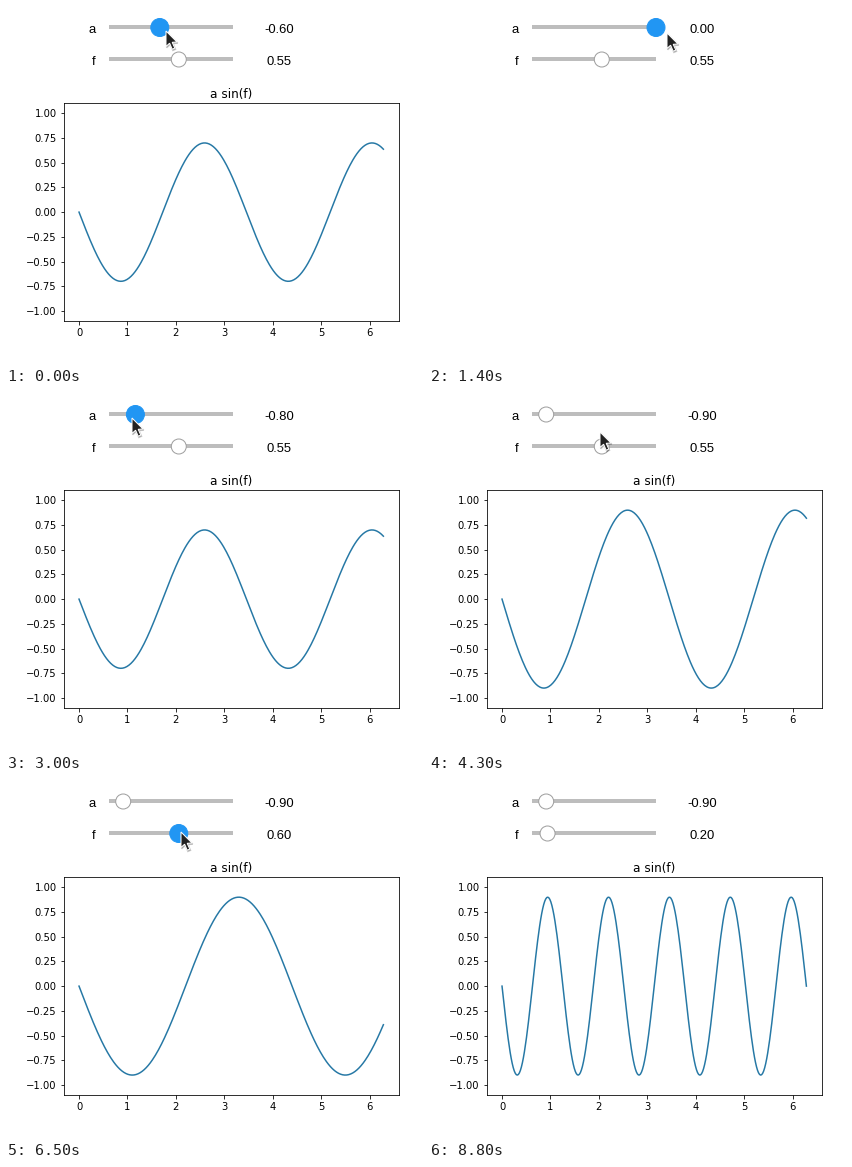
These frames come from a looping animation (417 by 359 pixels, 9100 ms). A matplotlib script:

```python
import numpy as np
import matplotlib.pyplot as plt
from matplotlib.animation import FuncAnimation
from matplotlib.patches import Circle, Polygon, Rectangle

W, H, DPI = 417, 359, 72
STEP, LOOP = 100, 9100
BLUE, GREY, EDGE = "#2196f3", "#bdbdbd", "#9e9e9e"
LEFT, SPAN = 105, 122          # thumb centre at the minimum, and its travel
A_END, F_START, F_END = 3700, 4900, 7800
BLANK = ((400, 500), (1400, 1500), (5700, 5900))

# Pointer moves: start ms, end ms, tip reached; it rests in between
HOME = (148, 26)
MOVES = (
    (-200, 0, 160, 25), (100, 600, 190, 26), (700, 1400, 238, 27),
    (1600, 2200, 178, 23), (2300, 3100, 119, 25),        # drag a
    (3700, 4100, 155, 37), (4200, 4300, 171, 39), (4300, 4500, 173, 48),
    (4800, 5500, 211, 53), (5800, 5900, 200, 53),        # drag f
    (6200, 6500, 175, 52), (6600, 7100, 136, 50), (7200, 7600, 118, 51),
    (8000, 8500, 62, 2),
)
ARROW = np.array([(0, 0), (0, 15.5), (3.6, 12.2), (6.2, 18.2),
                  (8.8, 17.1), (6.2, 11.3), (11, 11)])


def pointer(t):
    tip = np.array(HOME, float)
    for start, end, x, y in MOVES:
        done = np.clip((t - start) / (end - start), 0, 1)
        tip += (np.array((x, y)) - tip) * done
    return tip


def notch(t, count):
    """Slider step that the dragged thumb snaps to."""
    part = (pointer(t)[0] - LEFT - 2) / SPAN
    return round(np.clip(part, 0, 1) * count)


def a_step(t):
    return notch(min(t, A_END), 10)


def f_step(t):
    return notch(np.clip(t, F_START - STEP, F_END), 9)


def a_value(t):
    return a_step(t) / 10 - 1


def f_value(t):
    return 0.55 if t < F_START else 0.1 + f_step(t) / 10


fig = plt.figure(figsize=(W / DPI, H / DPI), dpi=DPI, facecolor="white")

plot = fig.add_axes([57.8 / W, (H - 314.84) / H, 334.8 / W, 217.44 / H])
xs = np.linspace(0, 2 * np.pi, 300)
curve, = plot.plot(xs, np.zeros_like(xs), color="#2678a5", lw=1.5)
plot.set_xlim(-0.1 * np.pi, 2.1 * np.pi)
plot.set_ylim(-1.1, 1.1)
plot.set_yticks(np.linspace(-1, 1, 9))
plot.set_title("a sin(f)", pad=5)

page = fig.add_axes([0, 0, 1, 1])
page.set_xlim(0, W)
page.set_ylim(H, 0)
page.axis("off")


def slider(name, y):
    font = dict(family="Liberation Sans", size=13, color="black")
    page.text(89.3, y + 6, name, ha="right", va="baseline", **font)
    page.add_patch(Rectangle((103, y - 2), 124, 4, fc=GREY, lw=0))
    thumb = page.add_patch(Circle((LEFT, y + 0.5), 7.5, lw=1, zorder=3))
    label = page.text(273, y + 6, "", ha="center", va="baseline", **font)
    return thumb, label


def set_slider(parts, part, value, hover, held):
    thumb, label = parts
    thumb.center = (LEFT + SPAN * part, thumb.center[1])
    thumb.set_radius(9 if held else 7.5)
    thumb.set_facecolor(BLUE if hover else "white")
    thumb.set_edgecolor(BLUE if hover else EDGE)
    label.set_text(f"{value:.2f}")


a_slider = slider("a", 21)
f_slider = slider("f", 53)
shadow = page.add_patch(Polygon(ARROW, fc="black", ec="black", lw=1.5,
                                alpha=0.2, zorder=4))
arrow = page.add_patch(Polygon(ARROW, fc="#222222", ec="white", lw=1, zorder=5))


def draw(i):
    t = i * STEP
    a_held = t < 4000
    f_hover = 4500 <= t < 8800
    set_slider(a_slider, a_step(t) / 10, a_value(t), a_held, a_held)
    set_slider(f_slider, f_step(t) / 9, f_value(t), f_hover,
               f_hover and t >= F_START)

    # The plot trails behind the sliders
    curve.set_ydata(a_value(t - 300) * np.sin(xs / f_value(t - 200)))
    plot.set_visible(not any(lo <= t < hi for lo, hi in BLANK))

    tip = np.round(pointer(t))
    arrow.set_xy(ARROW + tip)
    shadow.set_xy(ARROW + tip + (0.7, 1.2))
    for part in (arrow, shadow):
        part.set_visible(t < 8600)
    return curve, arrow, shadow


anim = FuncAnimation(fig, draw, frames=LOOP // STEP, interval=STEP,
                     init_func=lambda: draw(0), repeat=True, repeat_delay=0)
plt.show()
```
